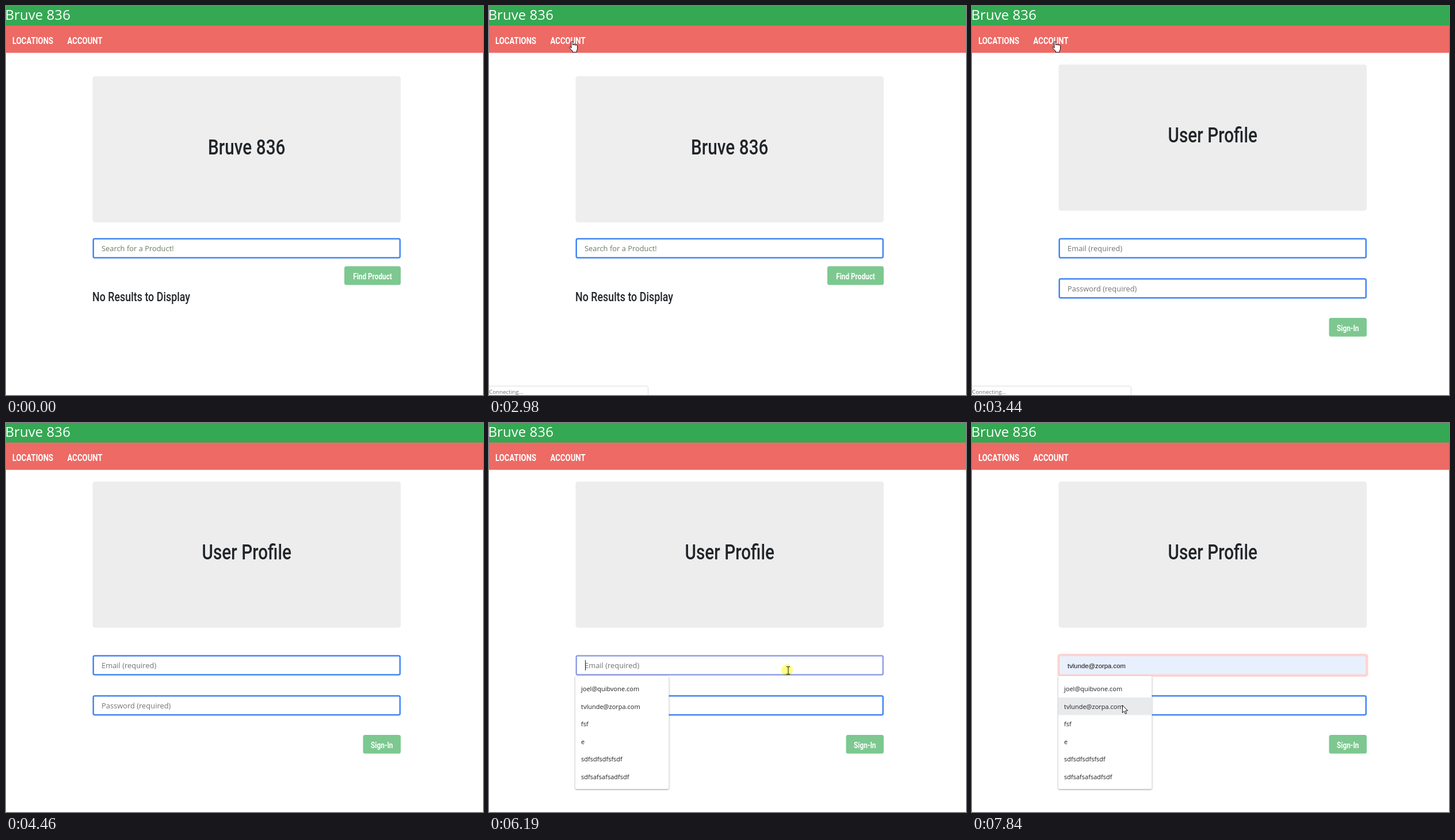
Write an HTML page that moves like this. It is 829 px wide and 676 px high and loops after 8000 ms.

```html
<!DOCTYPE html>
<html lang="en">
<head>
<meta charset="utf-8">
<title>Store sign-in</title>
<style>
html, body { margin: 0; width: 100%; height: 100%; overflow: hidden; background: #fff; }
svg { display: block; width: 100vw; height: 100vh; }
text { font-family: "Open Sans", "Noto Sans", sans-serif; white-space: pre; }
.narrow { font-family: Roboto, "Liberation Sans", sans-serif; font-weight: 500; }
.bold { font-weight: 700; }
.plain { font-family: "Liberation Sans", sans-serif; }
.popup { filter: drop-shadow(0 1px 1.5px rgba(0, 0, 0, .4)); }
.spot { mix-blend-mode: multiply; }
</style>
</head>
<body>
<svg id="stage" viewBox="0 0 829 676"></svg>
<script>
const LOOP = 8000, STEP = 78;
const BRAND = "Bruve 836";
const EMAIL = "tvlunde@zorpa.com";
const SUGGESTIONS = ["joel@quibvone.com", EMAIL, "fsf", "e", "sdfsdfsdfsfsdf", "sdfsafsafsadfsdf"];
const LEFT = 150.5, WIDTH = 535.5, RIGHT = LEFT + WIDTH, MIDDLE = LEFT + WIDTH / 2;
const ROW = 30.5, ROWS_TOP = 446.5;
const BLUE = "#4285f4", INK = "#212529", HINT = "#757575";

// Each move is a quadratic curve; without "from" it starts where the last one ended.
const MOVES = [
  { start: 500, end: 1290, from: [806, 676], bend: [790, 420], to: [699, 289] },
  { start: 1340, end: 2110, bend: [129, 32], to: [96, 59] },
  { start: 2200, end: 2510, bend: [125, 60], to: [144, 61] },
  { start: 4140, end: 4380, bend: [140, 78], to: [661, 190], hideAt: 4460 },
  { start: 5080, end: 5860, from: [806, 159], bend: [600, 400], to: [520, 430] },
  { start: 6410, end: 7190, bend: [420, 440], to: [328, 465] },
  { start: 7290, end: 7580, bend: [290, 484], to: [261, 490] }
];
MOVES.forEach((m, i) => m.from ??= MOVES[i - 1].to);

const ARROW = "M.5.5V13.5l3-2.8 2 4.8 2.2-.9-2-4.7h4z";
const HAND = "M-1 12V2q0-1.5 1.4-1.5t1.4 1.5v5q0-1.3 1.4-1.3t1.4 1.4q0-1.1 1.3-1.1t1.3 1.5" +
  "q0-1 1.2-1t1.2 1.4v5q0 2.5-1.4 4.2v2.2h-6.8v-2.1Q-2 15-4 11.6q-.4-1.2.7-1.6t2.3 2z";
const IBEAM = "M-3-6.5h2q1 0 1 1 0-1 1-1h2M0-5.5v11M-3 6.5h2q1 0 1-1 0 1 1 1h2";

const rect = (x, y, w, h, fill, r = 0, more = "") =>
  `<rect x="${x}" y="${y}" width="${w}" height="${h}" rx="${r}" fill="${fill}" ${more}/>`;
const text = (x, y, size, fill, str, more = "") =>
  `<text x="${x}" y="${y}" font-size="${size}" fill="${fill}" ${more}>${str}</text>`;
// Condensed face used by headings, links and buttons.
const narrow = (x, y, size, fill, str, anchor = "start", weight = "") =>
  `<text class="narrow ${weight}" transform="translate(${x} ${y}) scale(.82 1)" font-size="${size}" ` +
  `fill="${fill}" text-anchor="${anchor}">${str}</text>`;

const field = (y, hint, color = HINT, border = BLUE) =>
  rect(LEFT + 1.25, y + 1.25, WIDTH - 2.5, 33, "#fff", 2.5, `stroke="${border}" stroke-width="2.5"`) +
  text(166, y + 23, 12.9, color, hint);
const button = (y, w, label) =>
  rect(RIGHT - w, y, w, 32.5, "#7dc890", 3.5) +
  narrow(RIGHT - w / 2, y + 22.5, 14.4, "#fff", label, "middle", "bold");
const banner = (y, fill, title) =>
  rect(LEFT, y, WIDTH, 254, fill, 4.5) + narrow(MIDDLE, y + 135.5, 36.3, INK, title, "middle");
const link = (x, label) => narrow(x, 65.5, 16.1, "#fff", label, "start", "bold");

const nav = rect(0, 0, 829, 34, "#34a853") + rect(0, 34, 829, 47.4, "#ed6a65") +
  text(-1.5, 24, 24.1, "#fff", BRAND) + link(11, "LOCATIONS") + link(106.5, "ACCOUNT");

const searchPage = nav + banner(122, "#eee", BRAND) +
  field(403.2, "Search for a Product!", "#6c7d62") + button(452.2, 98, "Find Product") +
  narrow(150, 513, 21.8, INK, "No Results to Display");

function cursorAt(t) {
  const move = MOVES.findLast(m => m.start <= t);
  if (!move || t >= move.hideAt) return null;
  const { start, end, from, bend, to } = move;
  const steps = Math.round((end - start) / STEP);
  const done = Math.min(steps, Math.floor((t - start) / (end - start) * steps + 1e-6));
  const u = (done + 1) / (steps + 1), v = 1 - u;
  return from.map((a, k) => v * v * a + 2 * u * v * bend[k] + u * u * to[k]);
}

function drawCursor(t, [x, y]) {
  const onField = y > 403 && y < 439 && x < RIGHT;
  const shape = onField ? IBEAM : t >= 2200 && t < 4140 ? HAND : ARROW;
  return `<path d="${shape}" transform="translate(${x} ${y})" ` +
    `fill="${onField ? "none" : "#fff"}" stroke="#111" stroke-linejoin="round"/>`;
}

const clickSpot = (x, y) => `<circle class="spot" cx="${x}" cy="${y}" r="10" fill="#ffff80"/>`;

function statusBar(t) {
  if (t < 2590 || t >= 3920) return "";
  const loading = t >= 2900;
  const fade = 1 - Math.max(0, Math.ceil((t - 3770) / 75)) / 3;
  return `<g opacity="${fade}">` +
    rect(-5, 660.5, loading ? 281.5 : 154.5, 30, "#fff", 3, 'stroke="#dcdcdc"') +
    text(0, 674, 9.8, "#6b6b6b", loading ? "Connecting..." : "/user/profile") + "</g>";
}

function emailField(t, preview) {
  const hint = preview ? "" : "Email (required)";
  if (t < 6260) return field(403.2, hint, HINT, t < 6090 ? BLUE : t < 6190 ? "#6a92ee" : "#8f9fe4");
  return rect(LEFT - 2, 401, WIDTH + 4.5, 40, "#fbd5d3", 5) +
    field(403.2, hint, HINT, "#fbd5d3") +
    (preview ? rect(153.5, 405.5, 530, 31, "#e8f0fe", 1) +
      text(166, 426, 11.33, "#111", EMAIL, 'class="plain"') : "");
}

const suggestions = preview =>
  rect(150, 439.5, 162.5, 196.5, "#fff", 2.5, 'class="popup"') +
  (preview ? rect(150, ROWS_TOP + ROW, 162.5, ROW, "#e8eaec") : "") +
  SUGGESTIONS.map((s, i) =>
    text(160, ROWS_TOP + 19.5 + i * ROW, 11, "#202124", s, 'font-weight="500"')).join("");

function profilePage(t) {
  const focused = t >= 6090, preview = t >= 7290;
  const caret = focused && (t < 6340 || (t - 6340) % 1000 < 500);
  return nav + banner(101.7, "#ededed", "User Profile") +
    emailField(t, preview) + field(473, "Password (required)") + button(542, 65.5, "Sign-In") +
    (caret ? rect(167, 412, 1, 18, "#222") : "") + (focused ? suggestions(preview) : "");
}

function scene(t) {
  const cursor = cursorAt(t);
  const page = t < 3360 ? searchPage : t < 3440 ? "" : profilePage(t);
  const spot = t >= 2900 && t < 2980 ? clickSpot(145, 61)
    : t >= 6090 && t < 6260 ? clickSpot(518, 429.5) : "";
  return rect(0, 0, 829, 676, "#fff") + page + statusBar(t) + spot + (cursor ? drawCursor(t, cursor) : "");
}

const stage = document.getElementById("stage");
const began = performance.now();
let shown = "";
function tick() {
  const next = scene((performance.now() - began) % LOOP);
  if (next !== shown) stage.innerHTML = shown = next;
  requestAnimationFrame(tick);
}
tick();
</script>
</body>
</html>
```
